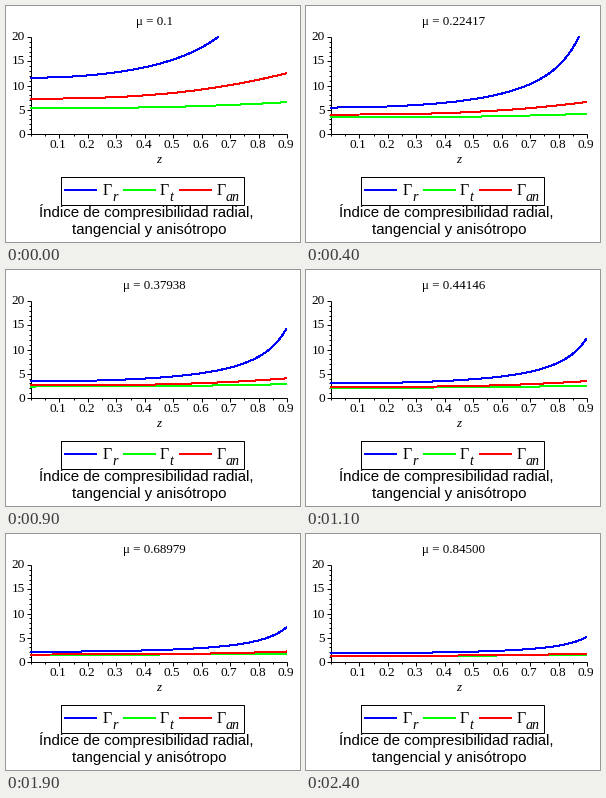
These frames come from a looping animation (294x236 px, 2.5 s). A matplotlib script:

```python
import numpy as np
import matplotlib.pyplot as plt
from matplotlib.animation import FuncAnimation

W, H, DPI = 294, 236, 64
STEPS, INTERVAL = 25, 100
X0, Y0 = 24.5, 127.5          # plot origin in pixels
SX, SY = 256 / 0.9, 4.85      # pixels per unit
YMAX = 20
BLUE, GREEN, RED = "#0000ff", "#00ff00", "#ff0000"
SERIF, SANS = "Liberation Serif", "Liberation Sans"

fig = plt.figure(figsize=(W / DPI, H / DPI), dpi=DPI, facecolor="white")
ax = fig.add_axes([0, 0, 1, 1])
ax.set_xlim(0, W)
ax.set_ylim(H, 0)
ax.axis("off")


def pt(px):
    return px * 72 / DPI


def label(x, y, s, size=13, font=SERIF, ha="center", style="normal"):
    return ax.text(x, y, s, fontsize=pt(size), family=font, ha=ha,
                   va="baseline", style=style, color="black")


def line(xs, ys, color="black", width=1):
    return ax.plot(xs, ys, color=color, lw=pt(width), snap=True,
                   solid_capstyle="butt", solid_joinstyle="miter")[0]


def hard_curve(color):
    # without antialiasing every touched pixel is filled: 1 px covers two rows
    return ax.plot([], [], color=color, lw=pt(1), antialiased=False,
                   snap=False, solid_capstyle="butt")[0]


def draw_axes():
    line([X0, X0], [Y0 - YMAX * SY, Y0 + 0.5])
    line([X0, X0 + 0.9 * SX], [Y0, Y0])
    for v in range(YMAX + 1):
        y = np.floor(Y0 - v * SY) + 0.5
        major = v % 5 == 0
        line([X0 - (4 if major else 2), X0], [y, y])
        if major:
            label(19, y + 4, str(v), 13.33, ha="right")
    for k in range(19):
        x = np.floor(X0 + k * 0.05 * SX) + 0.5
        major = k % 2 == 0 and k > 0
        line([x, x], [Y0, Y0 + (4 if major else 2)])
        if major:
            label(x - 0.5, 142, f"{k * 0.05:.1f}", 13.33)
    label(152.5, 157, "z", style="italic")


def draw_legend():
    line([54.5, 237.5, 237.5, 54.5, 54.5], [170.5, 170.5, 198.5, 198.5, 170.5])
    entries = [(58, 97, "r", BLUE), (117, 154, "t", GREEN), (173, 211, "an", RED)]
    for x, tx, sub, color in entries:
        line([x, x + 33], [184, 184], color, 2)
        label(tx, 189, "Γ", 16, ha="left")
        label(tx + 9, 195, sub, 14, ha="left", style="italic")


def draw_caption():
    label(140.5, 211, "Índice de compresibilidad radial,", 15, SANS)
    label(143, 228, "tangencial y anisótropo", 15, SANS)


z = np.linspace(0, 0.9, 513)


def radial(mu):
    rise = (1.225 - 1.25 * (mu - 0.28) ** 2) / mu
    u = 0.955 * z ** 2
    return 0.4 + 1.11 / mu + rise * u / (1 - u)


def tangential(mu):
    return 1.12 / (mu + 0.115) * (1 + (0.25 - 0.1 * mu) * (z / 0.9) ** 2.5)


def anisotropic(mu):
    return 1.06 / (mu + 0.0475) * (1 + (0.78 - 0.5 * mu) * (z / 0.9) ** (2.45 + mu))


draw_axes()
draw_legend()
draw_caption()
title = label(148, 19, "")
curves = [(hard_curve(color), f) for color, f in
          ((BLUE, radial), (GREEN, tangential), (RED, anisotropic))]


def update(i):
    units = 10000 + 74500 * i / (STEPS - 1)     # mu in 1e-5, ties round to even
    mu = units / 1e5
    title.set_text("μ = 0.1" if i == 0 else f"μ = {round(units) / 1e5:.5f}")
    for curve, f in curves:
        v = f(mu)
        shown = v <= YMAX
        curve.set_data(X0 + z[shown] * SX, Y0 - v[shown] * SY)
    return [title] + [c for c, _ in curves]


anim = FuncAnimation(fig, update, frames=STEPS, interval=INTERVAL,
                     repeat=True, repeat_delay=0, blit=False)
plt.show()
```
